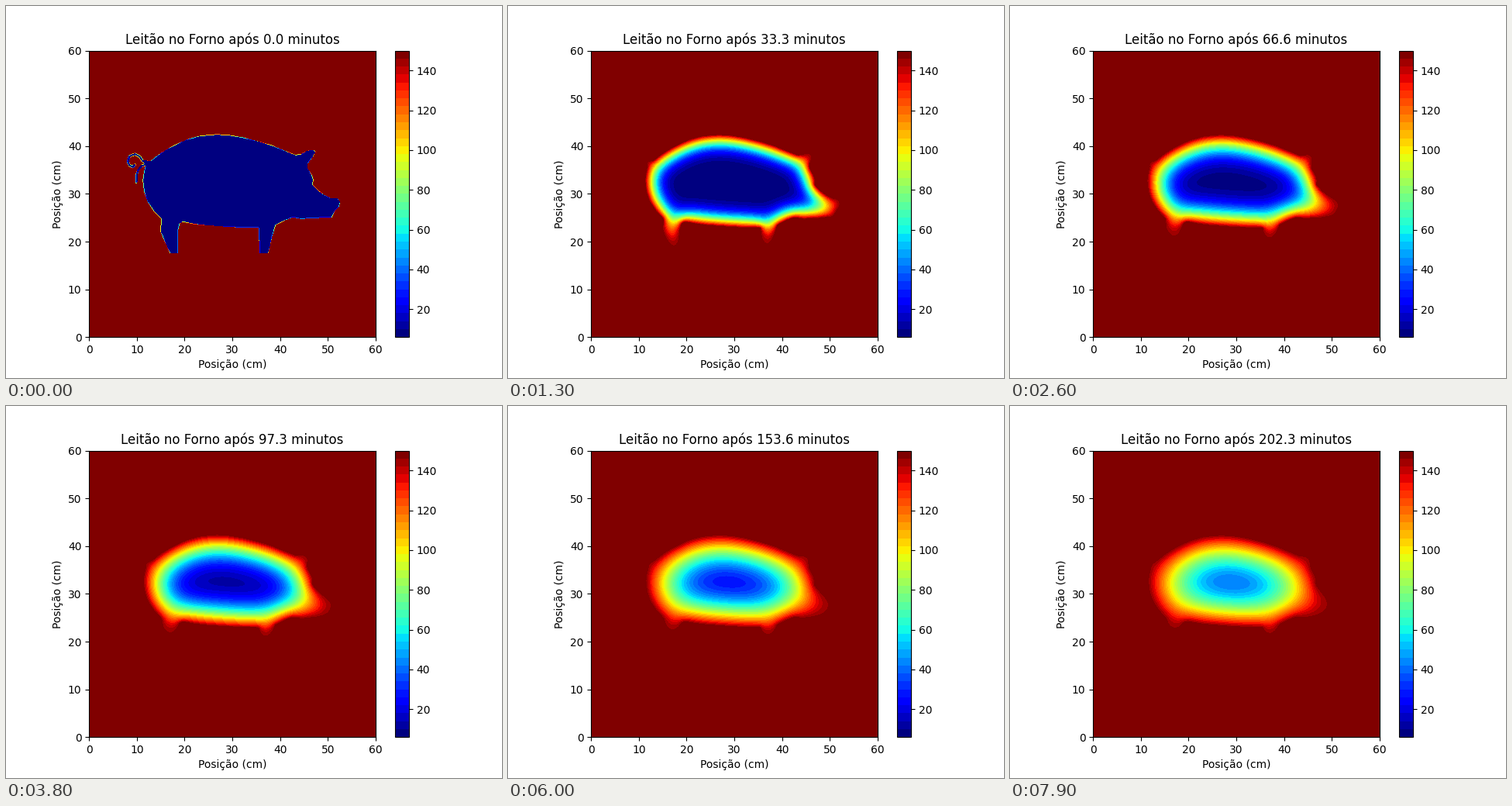
A matplotlib script for the animation above (8000 ms loop, 640 by 480 pixels).

```python
import numpy as np
import matplotlib.pyplot as plt
from matplotlib.animation import FuncAnimation
from matplotlib.cm import ScalarMappable
from matplotlib.colors import Normalize
from matplotlib.path import Path

SIZE = 60.0               # oven side, cm
COLD, HOT = 6.0, 150.0    # degrees C
ALPHA = 0.09              # diffusivity, cm^2 / min
FRAMES, STEP = 80, 2.5604 # minutes per frame
BANDS = 36
N = 401

BODY = [(12.9, 37.0), (15.1, 38.7), (17.5, 40.1), (20.3, 41.4), (23.2, 42.2),
        (26.8, 42.5), (29.7, 42.3), (32.1, 41.9), (35.4, 41.1), (38.6, 40.1),
        (41.0, 39.1), (43.3, 38.2), (44.4, 38.4), (45.6, 39.1), (46.9, 39.3),
        (47.6, 38.8), (46.9, 37.7), (45.9, 36.4), (45.9, 35.3), (46.7, 34.0),
        (47.0, 33.0), (46.9, 31.9), (47.9, 30.9), (49.2, 29.9), (50.5, 29.2),
        (52.1, 29.1), (52.7, 28.3), (52.4, 27.3), (51.6, 26.5), (50.9, 25.0),
        (48.3, 24.9), (44.3, 24.7), (42.7, 25.0), (41.0, 24.4), (39.1, 23.4),
        (38.4, 21.0), (37.6, 17.5), (35.6, 17.5), (35.5, 22.9), (31.3, 22.9),
        (28.0, 23.1), (24.0, 23.4), (21.6, 23.7), (19.6, 24.1), (19.0, 23.7),
        (18.7, 22.3), (18.7, 17.5), (16.9, 17.5), (16.0, 19.5), (14.9, 22.1),
        (15.1, 24.7), (13.4, 26.5), (12.1, 28.5), (11.5, 30.4), (11.2, 32.8),
        (11.5, 34.9), (11.8, 36.0), (11.2, 36.6)]
TAIL = [[(12.6, 36.7), (11.2, 36.9), (10.6, 37.8), (9.6, 38.3), (8.5, 37.9),
         (8.1, 36.8), (8.5, 35.9), (9.2, 35.6), (9.6, 36.1)],
        [(12.0, 36.1), (11.0, 35.9), (10.3, 35.0), (9.9, 33.8), (9.9, 32.5)]]

axis = np.linspace(0, SIZE, N)
X, Y = np.meshgrid(axis, axis)


def near(line, radius):
    """Grid points closer than radius to a polyline."""
    hit = np.zeros(X.shape, bool)
    for (x0, y0), (x1, y1) in zip(line, line[1:]):
        dx, dy = x1 - x0, y1 - y0
        s = np.clip(((X - x0) * dx + (Y - y0) * dy) / (dx**2 + dy**2), 0, 1)
        hit |= np.hypot(X - x0 - s * dx, Y - y0 - s * dy) < radius
    return hit


def pig_mask():
    pts = np.column_stack([X.ravel(), Y.ravel()])
    mask = Path(BODY).contains_points(pts).reshape(X.shape)
    for line in TAIL:
        mask |= near(line, 0.3)
    return mask


def simulate():
    """Heat equation inside the pig, oven air held at HOT."""
    pig = pig_mask()
    temp = np.where(pig, COLD, HOT)
    rows, cols = np.where(pig.any(1))[0], np.where(pig.any(0))[0]
    box = np.s_[rows[0] - 1:rows[-1] + 2, cols[0] - 1:cols[-1] + 2]
    h = SIZE / (N - 1)
    sub = int(np.ceil(ALPHA * STEP / (0.23 * h**2)))
    rate = pig[box][1:-1, 1:-1] * (ALPHA * STEP / sub / h**2)
    states = [temp.copy()]
    t = temp[box]
    for _ in range(FRAMES - 1):
        for _ in range(sub):
            t[1:-1, 1:-1] += rate * (t[2:, 1:-1] + t[:-2, 1:-1] + t[1:-1, 2:]
                                     + t[1:-1, :-2] - 4 * t[1:-1, 1:-1])
        states.append(temp.copy())
    return states


states = simulate()
levels = np.linspace(COLD, HOT, BANDS + 1)
cmap = plt.get_cmap("jet", BANDS)
norm = Normalize(COLD, HOT)

fig, ax = plt.subplots(figsize=(6.4, 4.8), dpi=100)
ax.set_aspect("equal")
fig.colorbar(ScalarMappable(norm, cmap), ax=ax)


def draw(i):
    ax.clear()
    ax.contourf(X, Y, states[i], levels=levels, cmap=cmap, norm=norm)
    ax.set(xlim=(0, SIZE), ylim=(0, SIZE),
           xlabel="Posição (cm)", ylabel="Posição (cm)",
           title=f"Leitão no Forno após {STEP * i:.1f} minutos")
    return []


anim = FuncAnimation(fig, draw, frames=FRAMES, init_func=lambda: [],
                     interval=100, repeat=True, repeat_delay=0)
plt.show()
```
